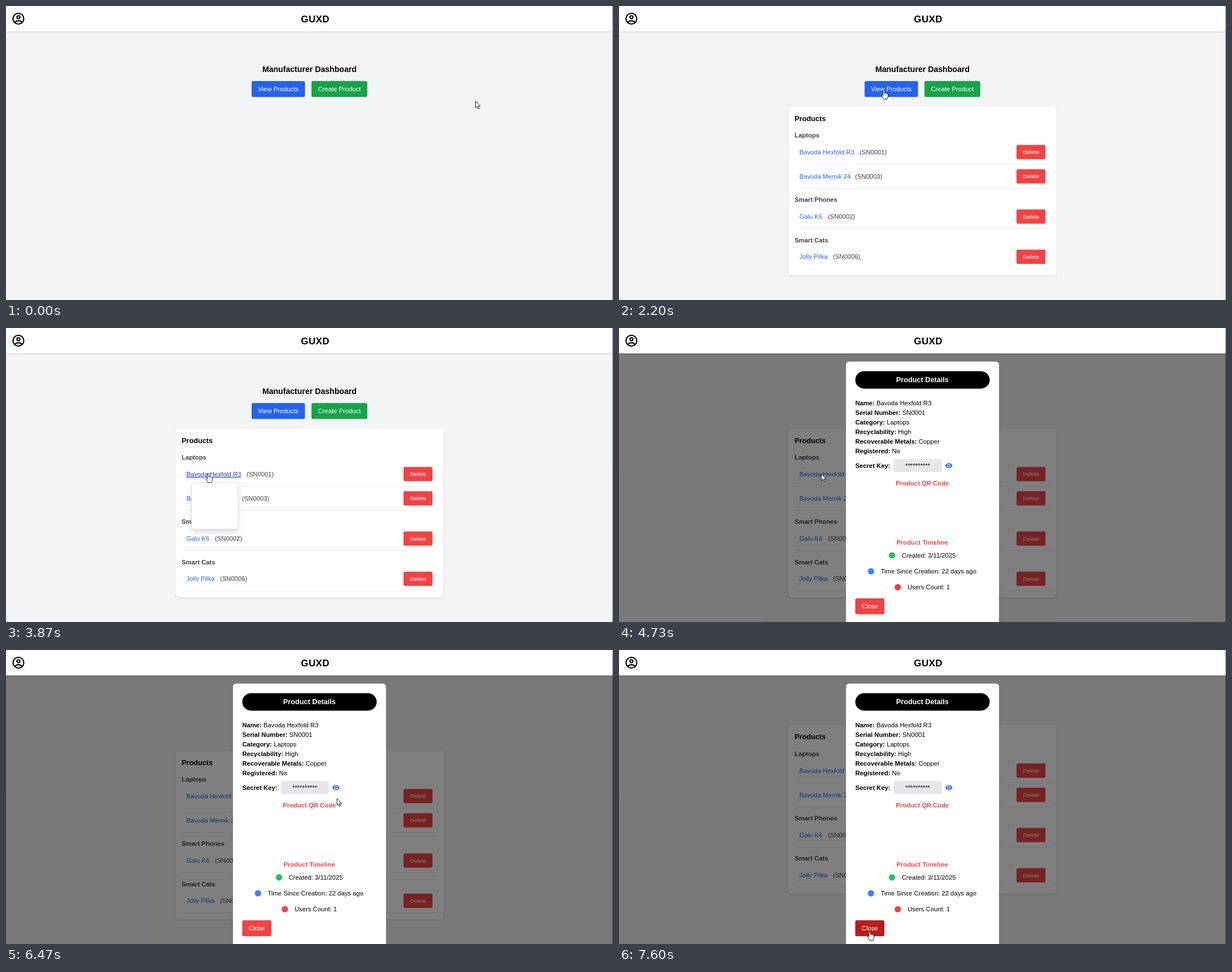
Recreate the animation shown at these times as an HTML page. Size 1075x521 px, loop 8000 ms.

```html
<!DOCTYPE html>
<html lang="en">
<head>
<meta charset="utf-8">
<title>Manufacturer Dashboard</title>
<style>
  html, body { margin: 0; width: 100%; height: 100%; overflow: hidden; background: #f3f4f6; }
  svg { display: block; width: 1075px; height: 521px; }
  text { font: 11.29px "Liberation Sans", Arial, sans-serif; white-space: pre; }
  .b, .label { font-weight: 700; }
  .mid { text-anchor: middle; }
  .white { fill: #fff; }
  .red { fill: #ef4444; }
  .blue { fill: #2563eb; }
  .gray { fill: #374151; }
  .s { font-size: 9.88px; }
  .l { font-size: 12.7px; }
  .xl { font-size: 14.11px; }
  .brand { font-size: 16.94px; letter-spacing: .025em; }
  .shadow { filter: drop-shadow(0 1.6px 1.8px #0002); }
  .shadow-lg { filter: drop-shadow(0 5px 5px #0002); }
  .hover { fill: #1e40af; text-decoration: underline; }
  .line { fill: none; stroke: #000; stroke-width: 2; }
  .cursor { fill: #fff; stroke: #000; stroke-width: .9; stroke-linejoin: round; }
</style>
</head>
<body>
<svg id="stage" viewBox="0 0 1075 521"></svg>
<script>
const SIZES = { s: 9.88, l: 12.7, xl: 14.11, brand: 16.94 };

// Text is placed by the vertical centre of its line.
function text(x, cy, str, cls = "", id = "") {
  const size = SIZES[cls.split(" ").find(c => SIZES[c])] || 11.29;
  return `<text id="${id}" class="${cls}" x="${x}" y="${cy + size * .3465}">${str}</text>`;
}
const rect = (x, y, w, h, fill, r = 0, extra = "") =>
  `<rect x="${x}" y="${y}" width="${w}" height="${h}" rx="${r}" fill="${fill}" ${extra}/>`;
const button = (x, y, w, h, fill, label, cls = "", id = "") =>
  rect(x, y, w, h, fill, 2.8, `id="${id}"`) + text(x + w / 2, y + h / 2, label, "white mid " + cls);

const product = (cy, name, serialX, serial, id) =>
  text(319.4, cy, name, "blue", id) +
  text(serialX, cy, `(${serial})`, "gray") +
  button(704, cy - 12.8, 51.3, 25.4, "#ef4444", "Delete", "s") +
  rect(311, cy + 21, 453, .8, "#e5e7eb");
const category = (cy, name) => text(311, cy, name, "b gray");
const detail = (cy, label, value) =>
  text(418.4, cy, `<tspan class="label">${label}:</tspan> ${value}`);
const event = (x, cy, fill, label) =>
  `<circle cx="${x}" cy="${cy}" r="5.65" fill="${fill}"/>` + text(x + 17.1, cy, label);

const laptop = "Bavoda Hexfold R3";

const page = `<g id="page">
  ${text(537.4, 111.7, "Manufacturer Dashboard", "b mid xl")}
  ${button(435, 133, 94.5, 28.2, "#2563eb", "View Products")}
  ${button(541, 133, 98.8, 28.2, "#16a34a", "Create Product")}
  <g id="list">
    ${rect(300.3, 178.3, 474.4, 298.9, "#fff", 5.6, 'class="shadow"')}
    ${text(311, 199.2, "Products", "b l")}
    ${category(229, "Laptops")}
    ${product(259, laptop, 426, "SN0001", "link")}
    ${product(302, "Bavoda Mernik 24", 418, "SN0003")}
    ${category(343.3, "Smart Phones")}
    ${product(373.2, "Galu K6", 370, "SN0002")}
    ${category(414.6, "Smart Cats")}
    ${product(444.5, "Jolly Pilka", 379, "SN0006")}
    ${rect(328.7, 274.2, 82.2, 82.2, "#fff", 4, 'id="popup" class="shadow-lg" stroke="#d1d5db" stroke-width=".7"')}
  </g>
</g>`;

const modal = `<g id="modal">
  ${rect(0, 45, 1075, 476, "#0008", 0, 'fill-opacity=".94"')}
  ${rect(402, 59.4, 271, 480, "#fff", 5.6)}
  ${rect(418.5, 76.4, 238, 31, "#000", 15.5)}
  ${text(537.3, 92, "Product Details", "b mid white l")}
  ${detail(133, "Name", laptop)}
  ${detail(150, "Serial Number", "SN0001")}
  ${detail(167, "Category", "Laptops")}
  ${detail(184, "Recyclability", "High")}
  ${detail(201, "Recoverable Metals", "Copper")}
  ${detail(217.8, "Registered", "No")}
  ${text(418.4, 244, "Secret Key:", "b")}
  ${rect(486.5, 232, 85, 23.6, "#e5e7eb", 2.8)}
  ${text(529, 244, "**********", "mid")}
  <g id="eye" transform="translate(584.2 244)">
    <path d="M-6.3 0C-3.5-5.9 3.5-5.9 6.3 0 3.5 5.9-3.5 5.9-6.3 0Z"/>
    <circle r="3.1" class="white"/><circle r="1.9"/>
  </g>
  ${text(537.3, 275.4, "Product QR Code", "b mid red")}
  ${text(537.1, 380.3, "Product Timeline", "b mid red")}
  ${event(483.6, 403, "#22c55e", "Created: 3/11/2025")}
  ${event(446.3, 431.2, "#3b82f6", "Time Since Creation: 22 days ago")}
  ${event(493.8, 459.4, "#ef4444", "Users Count: 1")}
  ${button(418.4, 479, 51.6, 28.3, "#ef4444", "Close", "", "close")}
</g>`;

const header = `
  ${rect(0, 0, 1075, 45, "#fff", 0, 'class="shadow"')}
  <g class="line" transform="translate(9.3 9.8) scale(1.058)">
    <circle cx="12" cy="12" r="9"/><circle cx="12" cy="9.5" r="2.5"/>
    <path d="M6 18C7.8 16 9.8 15.4 12 15.4S16.2 16 18 18"/>
  </g>
  ${text(522.3, 22.7, "GUXD", "b brand")}`;

const pointer = `<g id="cursor" class="cursor">
  <path id="arrow" d="M.5.5V12.6L3.3 9.9 5.3 14.4 7.2 13.6 5.2 9.2H8.7Z"/>
  <path id="hand" d="M-1.3 9.5V1.3a1.3 1.3 0 0 1 2.6 0V5.8c.3-1 2.2-.9 2.4.3.4-.8 2-.6 2.1.5.5-.6 1.6-.3 1.6.8V11.5c0 2-1.3 2.8-1.5 4.5H-.4C-.8 14-2 13-3.6 10.5-4.6 8.8-3 7.8-1.3 9.5Z"/>
</g>`;

const $ = id => document.getElementById(id);
$("stage").innerHTML = rect(0, 0, 1075, 521, "#f3f4f6") + page +
  rect(1074, 0, 1, 521, "#777") + modal + header + rect(1074, 0, 1, 45, "#777") + pointer;

// Pointer moves: start time, number of steps, points along the path.
const STEP = 66.5;
const moves = [
  [530, 13, [[831, 168], [640, 98], [400, 140], [385, 256], [469, 149]]],
  [2600, 7, [[469, 149], [382, 110], [303, 113]]],
  [3067, 6, [[303, 113], [268, 175], [313, 258]]],
  [3470, 7, [[313, 258], [358, 258]]],
  [5070, 13, [[358, 258], [400, 185], [500, 141], [600, 190], [592, 247]]],
  [5930, 2, [[592, 247], [585, 259]]],
  [6470, 13, [[585, 259], [584, 290], [545, 390], [494, 463]]],
  [7330, 5, [[494, 463], [465, 488], [444, 498.5]]]
];

const stepped = (t, start, n) =>
  t < start ? 0 : Math.min(1, (Math.floor((t - start) / STEP) + 1) / n);

// Catmull-Rom curve through the points, u from 0 to 1.
function spline(pts, u) {
  const last = pts.length - 1, i = Math.min(last - 1, Math.floor(u * last)), f = u * last - i;
  const p = k => pts[Math.max(0, Math.min(last, k))];
  return [0, 1].map(d => {
    const [a, b, c, e] = [p(i - 1)[d], p(i)[d], p(i + 1)[d], p(i + 2)[d]];
    return b + f * ((c - a) + f * ((2 * a - 5 * b + 4 * c - e) + f * (3 * (b - c) + e - a))) / 2;
  });
}

const show = (id, on) => $(id).style.display = on ? "" : "none";

function draw(now) {
  const t = now % 8000;
  const [start, n, pts] = moves.filter(m => m[0] <= t).pop() || moves[0];
  const [x, y] = spline(pts, stepped(t, start, n));
  const over = (x0, y0, x1, y1) => x >= x0 && x <= x1 && y >= y0 && y <= y1;

  const open = t >= 4730;
  const onLink = !open && t >= 2200 && over(319, 252, 418, 266);
  const onButton = !open && (over(435, 133, 530, 161) || over(541, 133, 640, 161));
  const onEye = open && over(576, 237, 595, 251);
  const onClose = open && over(418, 479, 470, 507);
  const hand = onLink || onButton || onEye || onClose;

  show("list", t >= 2200);
  show("popup", onLink);
  show("modal", open);
  show("hand", hand);
  show("arrow", !hand);
  $("link").setAttribute("class", onLink ? "hover" : "blue");
  $("eye").setAttribute("fill", onEye ? "#1e40af" : "#2563eb");
  $("close").setAttribute("fill", onClose ? "#b91c1c" : "#ef4444");
  $("page").setAttribute("transform", `translate(0 ${-45.2 * stepped(t, 6735, 3)})`);
  $("cursor").setAttribute("transform", `translate(${x} ${y})`);
  requestAnimationFrame(draw);
}
requestAnimationFrame(draw);
</script>
</body>
</html>
```
